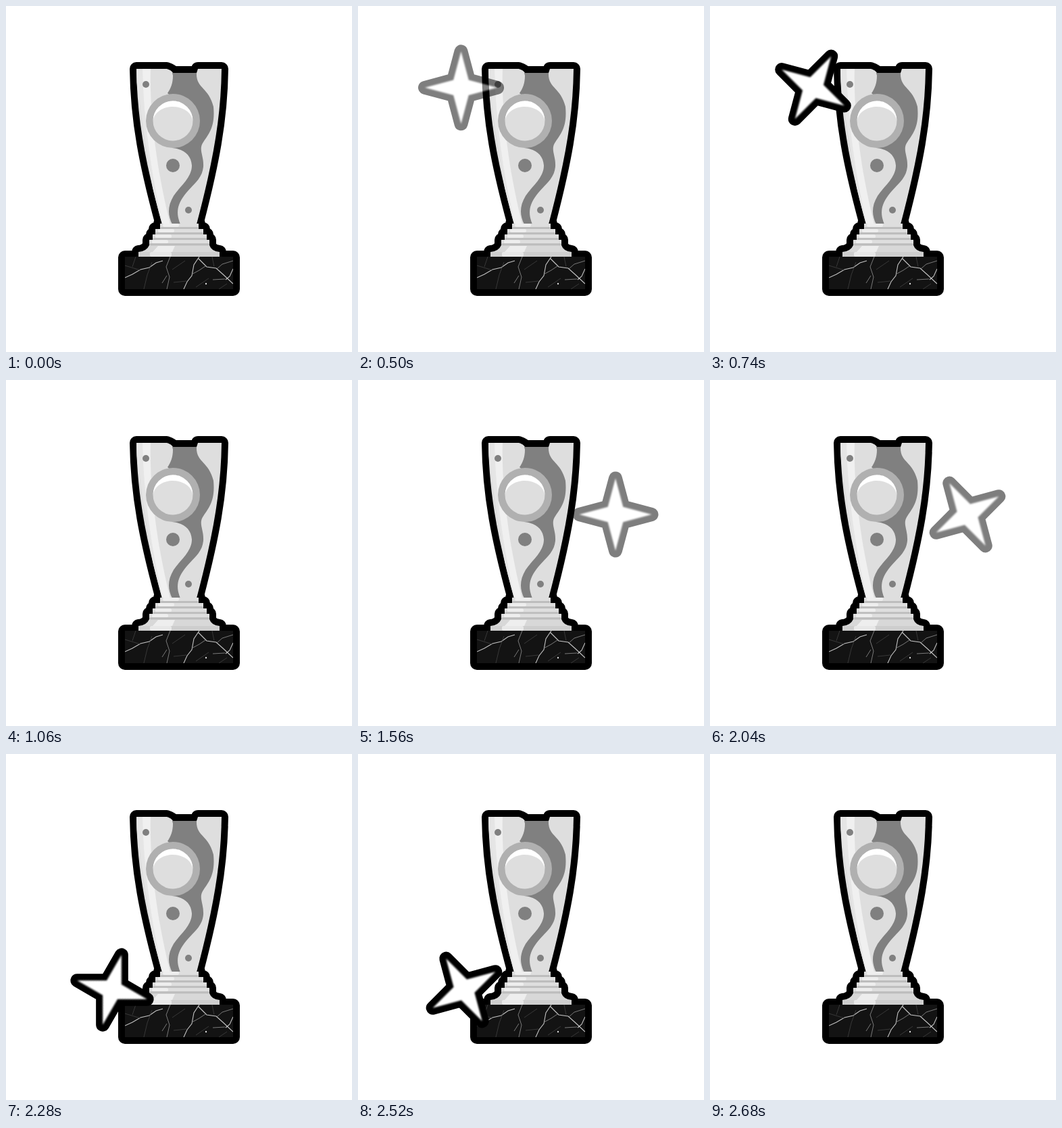
Animation, 512 px wide and 512 px high, one loop 3180 ms. Source, as an HTML page:

```html
<!DOCTYPE html>
<html lang="en">
<head>
<meta charset="utf-8">
<title>Trophy</title>
<style>
  html, body { margin: 0; width: 100%; height: 100%; overflow: hidden; background: #fff; }
  svg { display: block; width: 100%; height: 100%; }
</style>
</head>
<body>
<svg viewBox="0 0 512 512">
  <defs>
    <path id="body" d="M193 93H238Q245 95 247 99H282L284 93H319C318 170 305 235 282 323H231C207 235 194 170 193 93Z"/>
    <clipPath id="glass"><use href="#body"/></clipPath>
    <clipPath id="block"><rect x="176" y="371" width="160" height="48"/></clipPath>
    <path id="foot" d="M228 322H285V330H292V338H297V346H301V354Q304 363 316 364V371H196V364Q208 363 212 354V346H217V338H221V330H228Z"/>
    <filter id="soft" x="-20%" y="-20%" width="140%" height="140%"><feGaussianBlur stdDeviation="1.2"/></filter>
  </defs>

  <g stroke="#000" stroke-width="20" stroke-linejoin="round">
    <use href="#body"/>
    <use href="#foot"/>
    <rect x="176" y="372" width="160" height="47"/>
  </g>

  <g clip-path="url(#glass)">
    <path fill="#dedede" d="M180 90H330V325H180Z"/>
    <path fill="#e5e5e5" d="M190 93H202C203 160 213 240 233 323H225Z"/>
    <path fill="#f0f0f0" d="M202 93H214C212 150 222 240 243 323H232C213 240 203 160 202 93Z"/>
    <path fill="#808080" d="M246 99H282C281 122 300 120 307 149C310 180 299 190 291 203C285 213 293 222 292 238C290 257 276 264 264 280C252 296 252 308 258 323H246C239 309 239 296 248 281C258 266 275 254 275 236C274 221 264 212 246 210V135L239 129C244 122 247 114 247 103Z"/>
  </g>
  <g fill="#808080">
    <circle cx="207" cy="116" r="5"/>
    <circle cx="247" cy="236" r="10"/>
    <circle cx="270" cy="302" r="5"/>
  </g>
  <circle cx="247" cy="170" r="40" fill="#b0b0b0"/>
  <circle cx="247" cy="170" r="29.5" fill="#dedede"/>
  <path fill="#fff" d="M217.5 170A29.5 29.5 0 0 1 276.5 170C272 142 222 142 217.5 170Z"/>

  <g id="rings"><use href="#foot" fill="#d8d8d8"/></g>

  <g clip-path="url(#block)">
    <rect x="176" y="371" width="160" height="48" fill="#131313"/>
    <g fill="none" stroke="#c4c4c4">
      <path stroke-width="1.1" d="M176 402L187 397L199 390L212 387L222 380L232 377M286 371L278 383L275 399L268 408L263 419M284 373L292 381L297 386L311 388L321 397L336 411M336 389L331 400L325 405"/>
      <path stroke-width=".9" stroke="#858585" d="M243 371L237 386L242 401L238 419M275 397L286 391L295 385M238 399L231 410M312 389L320 382L336 377M306 405L324 404"/>
      <path stroke-width=".7" stroke="#484848" d="M192 371L187 386M216 379L209 398L204 419M176 384L199 391M246 390L265 377M248 409L267 407M281 416L300 403M305 371L308 386M315 419L327 411"/>
    </g>
    <circle cx="296" cy="411" r="1.2" fill="#ddd"/>
  </g>

  <g id="star">
    <path id="rays" stroke="#000" stroke-width="20" stroke-linejoin="round"/>
    <path id="core" fill="#fff" filter="url(#soft)"/>
  </g>
</svg>
<script>
const $ = id => document.getElementById(id);
const LOOP = 3180, STEP = 80;
const angles = [0, 0, 15, 30, 45, 60, 60];
const stars = [
  { start: 500, x: 152.5, y: 120.8, angles },
  { start: 1560, x: 381, y: 199, angles },
  { start: 2120, x: 157, y: 349, angles: [0, 0, 15, 15, 45, 60, 60] }
];

const points = Array.from({ length: 8 }, (_, i) => {
  const r = i % 2 ? 16 : 53.5, a = i * Math.PI / 4;
  return `${r * Math.sin(a)},${-r * Math.cos(a)}`;
});
for (const id of ["rays", "core"]) $(id).setAttribute("d", `M${points.join("L")}Z`);

// Stacked rings of the foot: a light band, its shine and a shaded lower lip
const bar = (x, y, w, h, fill) =>
  `<rect x="${x}" y="${y}" width="${w}" height="${h}" rx="2" fill="${fill}"/>`;
$("rings").innerHTML += [[228, 285], [221, 292], [217, 297], [212, 301]].map(([l, r], i) => {
  const y = 322 + i * 8.1;
  return bar(l, y, r - l, 8.1, "#dedede") + bar(l + 4, y, 24, 5, "#eeeeee") +
    bar(l, y + 5, r - l, 3.1, "#bdbdbd");
}).join("") +
  `<path fill="#eee" d="M225 355H250L246 364H217Z"/>` +
  bar(196, 364, 120, 7, "#cecece") + bar(213, 364, 32, 7, "#e8e8e8");

function draw() {
  const t = performance.now() % LOOP;
  const s = stars.find(({ start }) => t >= start && t < start + 7 * STEP);
  $("star").style.display = s ? "" : "none";
  if (s) {
    const i = Math.floor((t - s.start) / STEP);
    $("star").setAttribute("transform", `translate(${s.x} ${s.y}) rotate(${s.angles[i]})`);
    $("star").setAttribute("opacity", i === 0 || i === 6 ? 0.5 : 1);
  }
  requestAnimationFrame(draw);
}
draw();
</script>
</body>
</html>
```
